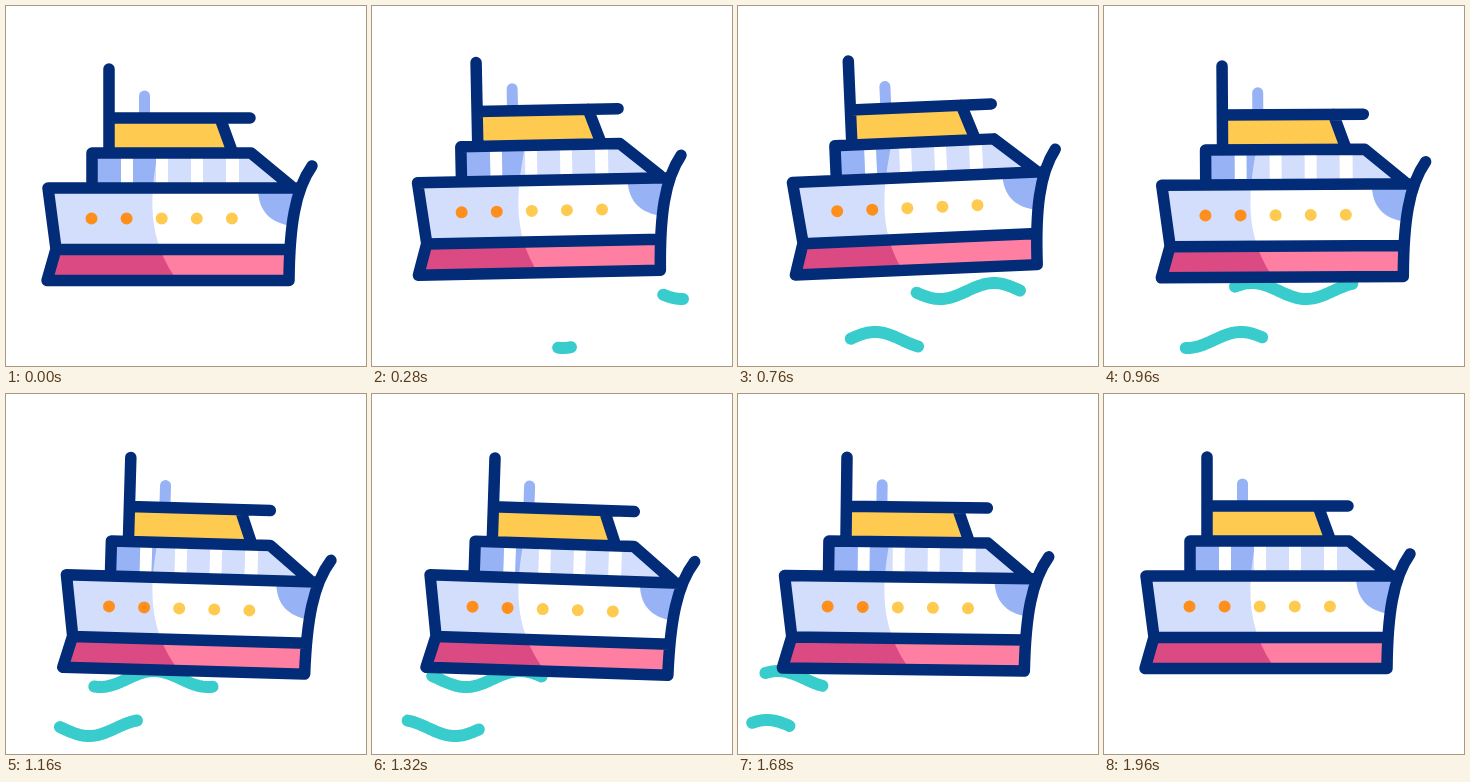
Animation, 360 px wide and 360 px high, one loop 2 s. Source, as an HTML page:

```html
<!DOCTYPE html>
<html lang="en">
<head>
<meta charset="utf-8">
<title>Yacht on waves</title>
<style>
  html, body { margin: 0; height: 100%; overflow: hidden; background: #fff; }
  svg { display: block; width: 100vw; height: 100vh; }
  .line, .wave { fill: none; stroke-linecap: round; stroke-linejoin: round; }
  .line { stroke: #022b78; stroke-width: 11.5; }
  .wave { stroke: #38cccc; stroke-width: 12; }
</style>
</head>
<body>
<svg viewBox="0 0 360 360">
  <defs>
    <!-- the shade stays in place while the boat moves through it -->
    <clipPath id="shade"><path d="M0 130H155C145 180 138 225 168 270L176 285H0Z"/></clipPath>
    <path id="windows" d="M86 147H115V182H86ZM127 147H150V182H127ZM162 147H185V182H162ZM197 147H220V182H197ZM233 147H245L283 182H233Z"/>
    <path id="hull" d="M42 182H293Q286 210 284 243H50Z"/>
    <path id="keel" d="M50 243H284L283 274H41Z"/>
    <path id="ports" d="M85.5 212.5H230" fill="none" stroke-width="12" stroke-linecap="round" stroke-dasharray="0 35.1"/>
  </defs>

  <path class="wave" id="upper"/>
  <path class="wave" id="lower"/>

  <g class="boat">
    <path d="M138.5 90V108" stroke="#97b3f5" stroke-width="11" stroke-linecap="round"/>
    <path d="M103 112H214L227 147H103Z" fill="#ffca50"/>
    <path d="M86 147H245L283 182H86Z" fill="#fff"/>
    <use href="#windows" fill="#d3defd"/>
    <use href="#hull" fill="#fff"/>
    <path d="M252 182C252 205 264 217 286 220L293 182Z" fill="#97b3f5"/>
    <use href="#keel" fill="#ff7fa2"/>
    <use href="#ports" stroke="#ffca50"/>
  </g>

  <g clip-path="url(#shade)">
    <g class="boat">
      <use href="#windows" fill="#97b3f5"/>
      <use href="#hull" fill="#d3defd"/>
      <use href="#keel" fill="#db4a83"/>
      <use href="#ports" stroke="#ff8f1c"/>
    </g>
  </g>

  <g class="boat">
    <path class="line" d="M103 63V147M103 112H244M214 112L226 145
      M86 181V147H245L285 180
      M292 182H42L50 243L41 274.5H283C283.5 220 289 184 306 160M50 243.5H284"/>
  </g>
</svg>
<script>
const LOOP = 2000;
const boats = document.querySelectorAll(".boat");
const clamp = u => Math.min(1, Math.max(0, u));
const progress = (t, start, end) => clamp((t - start) / (end - start));
const easeInOut = u => (1 - Math.cos(Math.PI * u)) / 2;
const easeOut = u => u + u * u * (1 - u);
const easeIn = u => 1 - easeOut(1 - u);

// Value eased from one [time, value] key to the next
const glide = (t, ...keys) => keys.slice(1).reduce((sum, [end, value], i) =>
  sum + (value - keys[i][1]) * easeInOut(progress(t, keys[i][0], end)), keys[0][1]);

// Visible stretch of a sine wave running from right to left
function drawWave(id, right, left, crest, midY, from, to) {
  const steps = 60;
  let d = "";
  for (let i = 0; i <= steps && to - from > .004; i++) {
    const x = right + (left - right) * (from + (to - from) * i / steps);
    const y = midY - 8 * Math.cos((x - crest) * 2 * Math.PI / 108);
    d += (i ? "L" : "M") + x.toFixed(2) + " " + y.toFixed(2);
  }
  document.getElementById(id).setAttribute("d", d);
}

function frame() {
  const t = performance.now() % LOOP;

  const x = glide(t, [0, 0], [720, 16.3], [1050, 16.3], [1950, 0]);
  const y = glide(t, [0, 0], [540, -14.5], [1250, 2.8], [1980, 0]);
  const tilt = glide(t, [0, 0], [640, -2.9], [1260, 1.95], [1980, 0]);
  for (const boat of boats)
    boat.setAttribute("transform", `translate(${x} ${y}) rotate(${tilt} 162 274.5)`);

  const head = easeOut(progress(t, 180, 1720));
  const tail = easeIn(progress(t, 380, 1960));
  drawWave("upper", 311, 27, 148, 285, tail, head);
  drawWave("lower", 199, 14, 137, 334, tail, head);

  requestAnimationFrame(frame);
}
frame();
</script>
</body>
</html>
```
